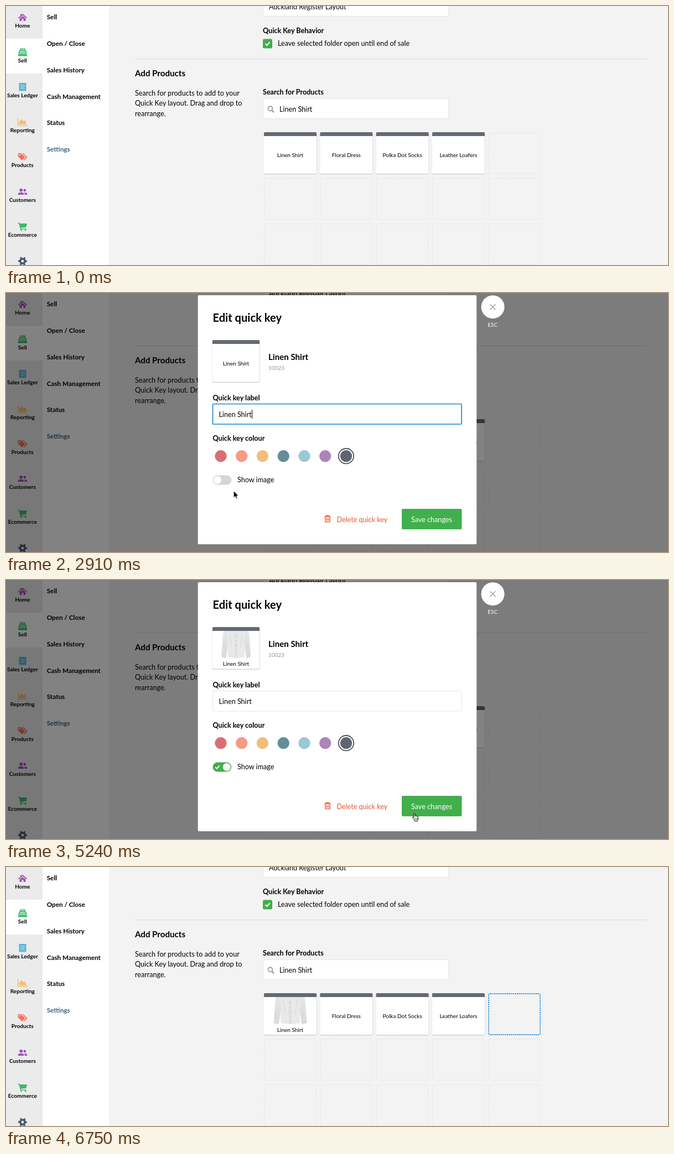
An HTML page for the animation above (7440 ms loop, 1196 by 468 pixels).

```html
<!DOCTYPE html>
<html lang="en">
<head>
<meta charset="utf-8">
<title>Edit quick key</title>
<style>
  html, body { margin: 0; width: 100%; height: 100%; overflow: hidden; background: #f3f3f3; }
  svg { display: block; width: 1196px; height: 468px; font-family: Lato, "Open Sans", sans-serif; }
</style>
</head>
<body>
<svg id="stage" viewBox="0 0 1196 468" xmlns="http://www.w3.org/2000/svg"></svg>
<script>
const LOOP = 7440;
const GREEN = '#41af4b', SLATE = '#646a73', BLUE = '#1a87d8';
const XS = 10.07, SM = 11.75, MD = 12.58, LG = 15.1, XL = 20.13;

// Text placed by the middle of its capitals.
const text = (x, mid, s, size = MD, o = {}) =>
  `<text x="${x}" y="${mid + size * 0.36}" font-size="${size}" font-weight="${o.bold ? 700 : 400}"
    fill="${o.fill || '#000'}" text-anchor="${o.anchor || 'start'}"${o.id ? ` id="${o.id}"` : ''}>${s}</text>`;
const bold = (x, mid, s, size = MD, o = {}) => text(x, mid, s, size, { ...o, bold: true });
const rect = (x, y, w, h, fill, extra = '') =>
  `<rect x="${x}" y="${y}" width="${w}" height="${h}" fill="${fill}" ${extra}/>`;
const line = (d, stroke, width, extra = '') =>
  `<path d="${d}" fill="none" stroke="${stroke}" stroke-width="${width}" ${extra}/>`;
const group = (id, body, extra = '') => `<g id="${id}" ${extra}>${body}</g>`;
const field = (x, y, w, h, id = '') =>
  rect(x + .5, y + .5, w - 1, h - 1, '#fff', `rx="1.5" stroke="#e5e5e5" ${id && `id="${id}"`}`);
const spinner = (id, x, y) => group(id,
  `<circle r="6" fill="none" stroke="${GREEN}" stroke-width="1.9" stroke-dasharray="28.3 9.4"/>`,
  `data-x="${x}" data-y="${y}"`);

// Navigation icons, each around its own centre.
const nav = [
  ['Home', '#a352b5', `<path d="M0-6.5L8 .6L6.9 1.9L0-4L-6.9 1.9L-8 .6L-3.9-3V-6H-2V-4.7Z"/>
    <path d="M0-2.6L5.4 2V6.5H1.6V2.8H-1.6V6.5H-5.4V2Z"/>`],
  ['Sell', '#3cb96e', `<path d="M-4.6-7H4.6V-4H5.6L8 2H-8L-5.6-4H-4.6ZM-8 3H8V7H-8Z"/>
    <path d="M-3-5.2H3M-4.6-2H4.6M-5.3 0H5.3" stroke="#fff" stroke-width=".9"/>`],
  ['Sales Ledger', '#58b5d3', `<path d="M-6.5-7.5H6.5V7.5L4.3 6.3L2.2 7.5L0 6.3L-2.2 7.5L-4.3 6.3L-6.5 7.5Z"/>
    <path d="M-3.8-3.5H3.8M-3.8-.5H3.8M-3.8 2.5H3.8" stroke="#d5eef6" stroke-width="1.1"/>`],
  ['Reporting', '#f0c074', `<path d="M-9-7H-7.4V5.4H9V7H-9Z"/>
    <path d="M-6.2 4.2V0L-2-5L1.4-1.4L4.4-3L7.6 4.2Z"/>`],
  ['Products', '#f4705c', `<path d="M-8.5-6.5H-2.8L4.6.8L-1 6.6L-8.5-1Z"/>
    <path d="M-.8-6.5H1.2L8.8.8L2.8 6.8L1.6 5.8L6.4.8Z"/><circle cx="-5.6" cy="-3.7" r="1.4" fill="#ebebeb"/>`],
  ['Customers', '#a352b5', `<circle cx="-2.8" cy="-2.8" r="2.9"/><circle cx="3.8" cy="-2.5" r="2.4"/>
    <path d="M-8.2 5.5V3.6Q-7 1.2-2.8 1.2T2.4 3.6V5.5ZM3.8 5.5V3.4L3 1.4Q7.6 1.2 8.2 3.8V5.5Z"/>`],
  ['Ecommerce', '#3cb96e', `<path d="M-8.5-7H-5.6L-5-5.4H8L6.4 1.2L-3.3 2.2L-3 3.4H6.4V4.7H-4.2L-6.6-5.6H-8.5Z"/>
    <circle cx="-2.6" cy="6.3" r="1.5"/><circle cx="5.2" cy="6.3" r="1.5"/>`]
];
const gear = `<g transform="translate(30 461)"><circle r="4.3" fill="none" stroke="#44576c" stroke-width="3.6"/>
  <circle r="6.9" fill="none" stroke="#44576c" stroke-width="2.2" stroke-dasharray="3.1 4.13" stroke-dashoffset="1.5"/></g>`;

const colX = c => 466 + c * 101.3;
const rowY = r => 228.5 + r * 82.3;
const names = ['Linen Shirt', 'Floral Dress', 'Polka Dot Socks', 'Leather Loafers'];
const cells = [];
for (let r = 0; r < 3; r++)
  for (let c = r ? 0 : 4; c < 5; c++) cells.push({ r, c, x: colX(c) + .8, y: rowY(r) + .5 });

const shirt = `<path d="M-18 0H-26Q-28.5 20-30 47L-21 49.5Q-17 32-15 12ZM18 0H26Q28.5 20 30 47L21 49.5Q17 32 15 12Z" fill="url(#cloth)"/>
  <path d="M-19 0H19L16.5 24L17.5 47Q0 51-17.5 47L-16.5 24Z" fill="#e9e9e9"/>
  <path d="M-5 0L-1.7 6V49M1.7 5V49M5 0L1.7 6M-13 2L-9 30M13 2L9 30M-22 20L-25 38M22 20L25 38" fill="none" stroke="#d3d3d3" stroke-width=".8"/>
  <path d="M0 9V45" stroke="#b5b5b5" stroke-width="1.4" stroke-dasharray="1.4 7"/>`;

function tile(id, x, y, w, h, label) {
  const mid = x + w / 2;
  return rect(x, y + 1, w + .7, h, '#d5d5d5', 'rx="2"') +
    rect(x, y, w, h - .6, '#fff', `rx="2" id="${id}"`) +
    line(`M${x} ${y + 7}V${y + 2}Q${x} ${y} ${x + 2} ${y}H${x + w - 2}Q${x + w} ${y} ${x + w} ${y + 2}V${y + 7}Z`, 'none', 0)
      .replace('fill="none"', `fill="${SLATE}"`) +
    text(mid, y + 41.7, label, XS, { anchor: 'middle', id: id + 'Label' });
}

const page = rect(0, 0, 1196, 468, '#f3f3f3') + rect(0, 0, 66, 468, '#ebebeb') +
  rect(0, 59, 66, 63, '#fff') + rect(66, 0, 121.5, 468, '#fff') + rect(187, 0, 1, 468, '#e9e9e9') +
  nav.map(([s, fill, icon], i) =>
    `<g transform="translate(30 ${20.5 + i * 63})" fill="${fill}">${icon}</g>` +
    bold(29.8, 35.6 + i * 63, s, XS, { anchor: 'middle' })).join('') + gear +
  ['Sell', 'Open / Close', 'Sales History', 'Cash Management', 'Status', 'Settings'].map((s, i) =>
    bold(73.7, 20 + i * 47.8, s, SM, { fill: i === 5 ? '#3c6480' : '#000' })).join('') +
  field(464, -18, 336, 37) + text(475, 1.5, 'Auckland Register Layout') +
  bold(464, 44, 'Quick Key Behavior') + rect(464, 59.5, 17, 17, GREEN, 'rx="2.5"') +
  line('M468.6 68.2L471.4 71L476.6 65.4', '#fff', 2) +
  text(491, 67.8, 'Leave selected folder open until end of sale') +
  rect(233, 95, 924, 1, '#d9d9d9') + bold(233, 122, 'Add Products', LG) +
  ['Search for products to add to your', 'Quick Key layout. Drag and drop to', 'rearrange.']
    .map((s, i) => text(233, 157.3 + i * 18.6, s)).join('') +
  bold(464, 155.7, 'Search for Products') + field(464, 167, 336, 37) +
  line('M480.4 188.6L484 192.2', '#8c8c8c', 2) +
  '<circle cx="477.4" cy="185.4" r="4" fill="none" stroke="#8c8c8c" stroke-width="1.6"/>' +
  text(494, 186, 'Linen Shirt') +
  cells.map((c, i) => rect(c.x, c.y, 93, 74, 'none', `id="cell${i}" rx="2"`)).join('') +
  names.map((s, i) => tile('card' + i, colX(i), 228, 95, 75.6, s)).join('') +
  group('cardShirt', shirt, 'transform="translate(513.5 235)"');

const colours = ['#d96f74', '#f39a88', '#f0c078', '#628e99', '#9ac8d6', '#ab85b9', '#5f6570'];
const bin = fill => `<g transform="translate(581 408)" fill="none" stroke="${fill}" stroke-width="1.4">
  <path d="M-5.6-4H5.6M-2-4.2V-5.8H2V-4.2M-4.1-3.8V5.6H4.1V-3.8M-1.4-1.5V3.6M1.4-1.5V3.6"/></g>`;
const buttons = (del, face, label) => bin(del) + text(597.5, 409, 'Delete quick key', MD, { fill: del }) +
  rect(715, 390, 108.5, 37, face, 'rx="2"') + text(769, 409, 'Save changes', MD, { fill: label, anchor: 'middle' });

const modal = rect(0, 0, 1196, 468, '#000', 'opacity=".49"') +
  rect(346.7, 4, 503.5, 450, '#fff', 'rx="2"') +
  '<circle cx="879.5" cy="25.2" r="21" fill="#fff"/>' + line('M874.5 20.2L884.5 30.2M884.5 20.2L874.5 30.2', '#9a9a9a', 1.3) +
  text(879.3, 57, 'ESC', XS, { fill: '#fff', anchor: 'middle' }) +
  bold(373.5, 44.3, 'Edit quick key', XL) +
  rect(372.5, 85, 86, 77, '#d8d8d8', 'rx="2.5"') + tile('preview', 373, 85, 85, 76, 'Linen Shirt') +
  group('previewShirt', shirt, 'transform="translate(415.7 92) scale(.88 1)"') +
  group('fetching', spinner('fetchSpin', 649, 115) +
    text(649, 132.3, 'Retrieving product information', XS, { fill: '#999', anchor: 'middle' })) +
  group('details', bold(474, 115.6, 'Linen Shirt', LG) + text(474, 135, '10023', XS, { fill: '#949494' })) +
  bold(373.5, 189, 'Quick key label') + field(373, 200, 450.5, 37.5, 'labelField') +
  text(384.5, 219.3, 'Linen Shirt') + rect(444, 211, 1, 16, '#000', 'id="caret"') +
  bold(373.5, 262, 'Quick key colour') +
  colours.map((f, i) => `<circle cx="${388 + i * 37.75}" cy="294.7" r="10.6" fill="${f}"/>`).join('') +
  '<circle cx="614.5" cy="294.7" r="13.7" fill="none" stroke="#4c525c" stroke-width="1.8"/>' +
  rect(373.5, 329.5, 33.7, 17, '#d5d5d5', 'rx="8.5" id="track"') +
  group('tick', line('M378.2 338.2L380.8 340.8L385.8 335.6', '#fff', 1.9)) +
  '<circle id="knob" cy="338" r="7.1" fill="#fff"/>' + text(418, 337.3, 'Show image') +
  rect(713.5, 388.5, 111.5, 40, 'none', 'id="ring" rx="3" stroke="#a9dbae" stroke-width="3"') +
  group('ready', buttons('#e8552f', GREEN, '#fff')) +
  group('saving', rect(529, 390, 294.5, 37, '#fdfdfd') + buttons('#e6e6e6', '#fcfcfc', '#a3a3a3') +
    spinner('saveSpin', 536.5, 409));

const hand = `<g transform="translate(-4 -1)" stroke="#000" stroke-linejoin="round">
  <path fill="#fff" d="M3 8.5V1.8Q3 .6 4 .6T5.1 1.8V5.4Q6.2 4.6 7.1 5.6Q8.3 5 9 6.1Q10.5 5.8 10.6 7.4V10Q10.4 12 9.6 13.2V14.6H4.4V13.4Q2.2 10.8.6 8.6Q.2 7.2 1.4 7.2Q2.2 7.4 3 8.5Z"/>
  <path fill="none" stroke-width=".7" d="M5.2 9.3V12.2M7 9.3V12.2M8.7 9.3V12.2"/></g>`;
const arrow = '<path d="M0 0V12.4L2.9 9.8L4.7 14L6.8 13.1L5 9H8.9Z" fill="#000" stroke="#fff" stroke-width=".9"/>';

document.getElementById('stage').innerHTML =
  `<defs><linearGradient id="cloth" x1="0" y1="0" x2="0" y2="1"><stop stop-color="#e6e6e6"/>
  <stop offset="1" stop-color="#dadada"/></linearGradient></defs>` +
  page + group('modal', modal) + group('pointer', group('hand', hand) + group('arrow', arrow));

const el = {};
document.querySelectorAll('[id]').forEach(n => el[n.id] = n);
const set = (id, attrs) => { for (const k in attrs) el[id].setAttribute(k, attrs[k]); };
const show = (id, on) => set(id, { visibility: on ? 'visible' : 'hidden' });
const within = (t, a, b) => t >= a && t < b;

// Pointer moves: start, end, steps, bend point, end point, constant speed.
const moves = [
  [600, 600, 1, 296, 439, 296, 439],
  [780, 1250, 6, 400, 360, 505, 293],
  [2500, 3180, 8, 420, 397, 383, 335],
  [3980, 4540, 7, 460, 340, 540, 359],
  [4630, 5240, 8, 780, 444, 738, 422],
  [6220, 6220, 1, 751, 422, 751, 422],
  [6400, 6750, 5, 1122, 425, 1195, 475, true]
];

// Hard steps: 1/n at the start, 1 at the end.
function stepped(t, a, b, n) {
  if (t < a) return 0;
  if (t >= b) return 1;
  return (Math.floor((t - a) / (b - a) * (n - 1) + 1e-6) + 1) / n;
}

function pointerAt(t) {
  const i = moves.findLastIndex(m => t >= m[0]);
  if (i < 0) return null;
  const [a, b, n, bx, by, ex, ey, even] = moves[i];
  const [sx, sy] = i ? moves[i - 1].slice(5, 7) : [ex, ey];
  let p = stepped(t, a, b, n);
  if (!even) p = p * p * (3 - 2 * p);
  const q = 1 - p, at = (s, m, e) => q * q * s + 2 * q * p * m + p * p * e;
  return { x: at(sx, bx, ex), y: at(sy, by, ey) };
}

function spin(id, angle) {
  const { x, y } = el[id].dataset;
  set(id, { transform: `translate(${x} ${y}) rotate(${angle})` });
}

function render(t) {
  const p = pointerAt(t);
  const open = within(t, 1880, 6040), saved = t >= 6040, imaged = within(t, 3600, 6040);
  const inside = (x, y, w, h) => p && p.x >= x && p.x < x + w && p.y >= y && p.y < y + h;
  const overCard = t < 1880 && inside(466, 235, 95, 68);

  show('pointer', p);
  if (p) {
    set('pointer', { transform: `translate(${p.x} ${p.y})` });
    const pointing = overCard || within(t, 1250, 2500) || within(t, 3360, 3980) || within(t, 5060, 6220);
    show('hand', pointing);
    show('arrow', !pointing);
  }

  set('card0', { fill: overCard ? '#dfe1e3' : '#fff' });
  set('card0Label', { y: (saved ? 294.2 : 269.7) + XS * 0.36 });
  show('cardShirt', saved);
  cells.forEach((c, i) => {
    const hot = (saved && i === 0) || ((t < 1880 || t >= 6400) && inside(c.x, c.y, 93, 74));
    set('cell' + i, { stroke: hot ? BLUE : '#dedede', 'stroke-width': hot ? 1.8 : 1, 'stroke-dasharray': hot ? '2 1.5' : '1.7 1.7' });
  });

  set('modal', { display: open ? 'inline' : 'none' });
  if (!open) return;

  set('fetching', { display: t < 2020 ? 'inline' : 'none' });
  set('details', { display: t < 2020 ? 'none' : 'inline' });
  spin('fetchSpin', 225);
  const focused = within(t, 2020, 3600);
  set('labelField', { stroke: focused ? BLUE : '#e5e5e5', 'stroke-width': focused ? 1.7 : 1 });
  set('caret', { opacity: within(t, 2020, 2320) || within(t, 2790, 3180) ? 1 : 0 });

  set('previewShirt', { display: imaged ? 'inline' : 'none' });
  set('previewLabel', { y: (imaged ? 151.8 : 127) + XS * 0.36 });
  set('knob', { cx: 382 + 16.7 * stepped(t, 3600, 3710, 2) });
  set('track', { fill: t < 3710 ? '#d5d5d5' : t < 3860 ? '#c8d3c9' : t < 3980 ? '#b1ccb3' : GREEN });
  set('tick', { opacity: t < 3980 ? 0 : 1 });

  const fade = stepped(t, 5630, 5920, 4);
  set('ring', { opacity: within(t, 5450, 5630) ? 1 : 0 });
  set('ready', { opacity: 1 - fade });
  set('saving', { opacity: fade });
  spin('saveSpin', -45 + (fade * 4 - 4) * 45);
}

const start = performance.now();
function frame() {
  render((performance.now() - start) % LOOP);
  requestAnimationFrame(frame);
}
frame();
</script>
</body>
</html>
```
